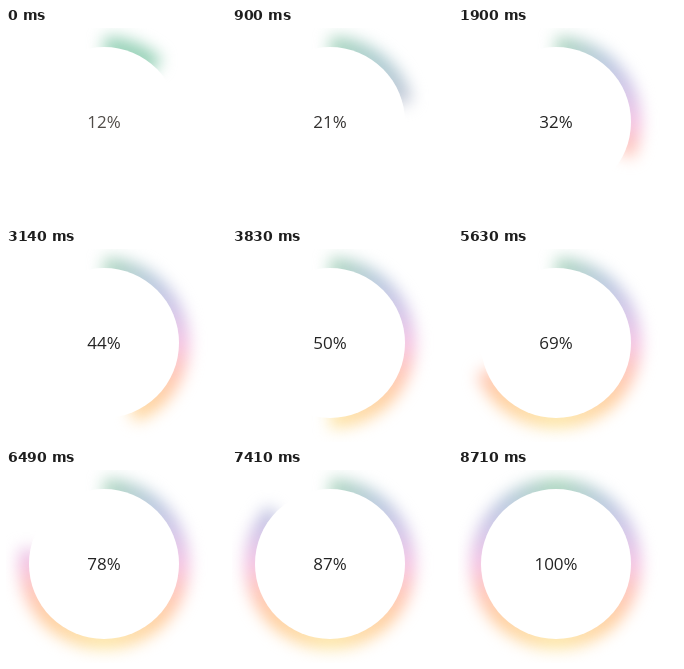
Recreate the animation shown at these times as an HTML page with a canvas. Size 220 by 193 pixels, loop 9.11 s.

```html
<!DOCTYPE html>
<html lang="en">
<head>
<meta charset="utf-8">
<title>Glowing progress ring</title>
<style>
  html, body { margin: 0; width: 100%; height: 100%; overflow: hidden; background: #fff; }
  canvas { display: block; }
</style>
</head>
<body>
<canvas id="stage" width="220" height="193"></canvas>
<script>
const ctx = document.getElementById('stage').getContext('2d');
const LOOP = 9110, TICK = 77.35;
const CX = 98, CY = 94, RADIUS = 75;
const TOP = -Math.PI / 2, TURN = Math.PI * 2;

// Ring colours from the top down to the bottom, mirrored on the left side
const STOPS = [
  [0, [164, 211, 184]],
  [0.11, [180, 196, 220]],
  [0.18, [204, 191, 230]],
  [0.25, [244, 189, 226]],
  [0.31, [255, 192, 176]],
  [0.375, [255, 203, 152]],
  [0.5, [253, 230, 164]],
];
const START_GREEN = [146, 207, 180];

const clamp = (v, lo, hi) => Math.min(hi, Math.max(lo, v));
const mix = (a, b, k) => `rgb(${a.map((v, i) => Math.round(v + (b[i] - v) * k))})`;

// The counter is sampled on a coarse clock, so some values stay longer
function percentAt(ms) {
  const tick = Math.floor((ms + 35) / TICK);
  return Math.min(100, 12 + Math.floor(tick * 0.78 + 0.59));
}

function draw(percent) {
  const settle = clamp((percent - 12) / 14, 0, 1);

  ctx.fillStyle = '#fff';
  ctx.fillRect(0, 0, 220, 193);

  const ring = ctx.createConicGradient(TOP, CX, CY);
  for (const [at, rgb] of STOPS) {
    const colour = mix(START_GREEN, rgb, settle);
    ring.addColorStop(at, colour);
    ring.addColorStop(1 - at, colour);
  }

  ctx.filter = 'blur(8px)';
  ctx.strokeStyle = ring;
  ctx.lineWidth = 20;
  ctx.beginPath();
  ctx.arc(CX, CY, RADIUS, TOP, TOP + TURN * percent / 100);
  ctx.stroke();
  ctx.filter = 'none';

  ctx.beginPath();
  ctx.arc(CX, CY, RADIUS, 0, TURN);
  ctx.fill();

  ctx.fillStyle = mix([80, 76, 72], [36, 36, 36], settle);
  ctx.font = '17px "Open Sans", "Noto Sans", sans-serif';
  ctx.textAlign = 'center';
  ctx.fillText(percent + '%', CX, 100);
}

function frame() {
  draw(percentAt(performance.now() % LOOP));
  requestAnimationFrame(frame);
}
frame();
</script>
</body>
</html>
```
